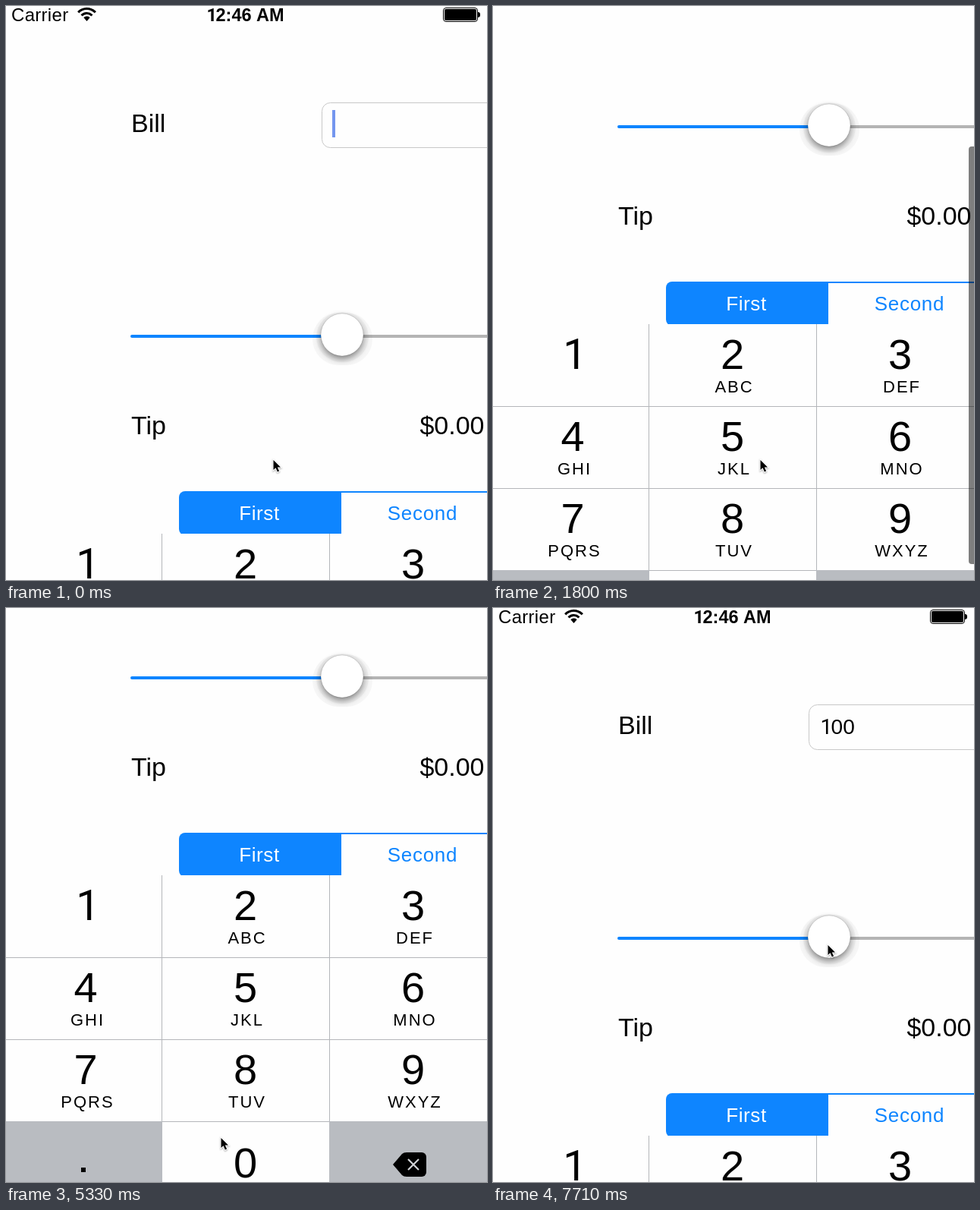
Recreate the animation shown at these times as an HTML page with a canvas. Size 634 by 756 pixels, loop 8 s.

```html
<!DOCTYPE html>
<html lang="en">
<head>
<meta charset="utf-8">
<title>Tip calculator</title>
<style>
html, body { margin: 0; width: 634px; height: 756px; overflow: hidden; background: #fefefe; }
canvas { display: block; }
</style>
</head>
<body>
<canvas id="stage" width="634" height="756"></canvas>
<script>
const c = document.getElementById('stage').getContext('2d');
const LOOP = 8000, BLUE = '#0e85ff', GREY = '#b9bcc1', LINE = '#b4b6ba', PAPER = '#fefefe';
const SANS = '"Liberation Sans", Arial, sans-serif';
const PLAIN_ONE = 'Roboto, sans-serif'; // its 1 has no foot

// Stepped progress: first change at start, last one at end.
function progress(t, start, end, steps) {
  if (t < start) return 0;
  if (t >= end) return 1;
  return (Math.floor((t - start) / (end - start) * (steps - 1)) + 1) / steps;
}
const smooth = p => p * p * (3 - 2 * p);

function scrollAt(t) {
  const down = smooth(progress(t, 150, 2100, 14)) ** 3.8;
  const up = smooth(progress(t, 5890, 6670, 6)) ** 0.515;
  return Math.round(343 * (down - up));
}

const moves = [ // start, end, steps, x, y
  [2400, 2835, 4, 97, 385],
  [2980, 2980, 1, 102, 386],
  [3870, 4460, 5, 283, 700],
  [5330, 5330, 1, 283, 698],
  [5460, 5590, 2, 297, 248],
  [6970, 7710, 6, 441, 444]
];
function pointerAt(t) {
  let x = 352, y = 598;
  for (const [start, end, steps, toX, toY] of moves) {
    const p = smooth(progress(t, start, end, steps));
    x += (toX - x) * p;
    y += (toY - y) * p;
  }
  return [Math.round(x), Math.round(y)];
}

function rect(x, y, w, h, color) {
  c.fillStyle = color;
  c.fillRect(x, y, w, h);
}
function round(x, y, w, h, r, color) {
  c.beginPath();
  c.roundRect(x, y, w, h, r);
  c.fillStyle = color;
  c.fill();
}
function polygon(points) {
  c.beginPath();
  for (const [x, y] of points) c.lineTo(x, y);
  c.closePath();
}
function label(str, x, y, size, { color = '#000', weight = 400, align = 0, spacing = 0 } = {}) {
  const font = family => c.font = `${weight} ${size}px ${family}`;
  c.fillStyle = color;
  c.letterSpacing = spacing + 'px';
  font(SANS);
  x -= c.measureText(str).width * align;
  if (str[0] === '1') {
    font(PLAIN_ONE);
    c.fillText('1', x + size * 0.05, y);
    font(SANS);
    x += c.measureText('1').width;
    str = str.slice(1);
  }
  c.fillText(str, x, y);
}

function statusBar() {
  label('Carrier', 7, 20, 24, { spacing: 0.3 });
  label('12:46 AM', 315, 20, 23.5, { weight: 700, align: 0.5 });
  c.strokeStyle = '#000';
  c.lineWidth = 3;
  for (const r of [9.5, 15.5]) {
    c.beginPath();
    c.arc(106.5, 19, r, -Math.PI * 0.76, -Math.PI * 0.24);
    c.stroke();
  }
  c.beginPath();
  c.moveTo(106.5, 20);
  c.arc(106.5, 19, 5.5, -Math.PI * 0.77, -Math.PI * 0.23);
  c.fillStyle = '#000';
  c.fill();
  c.lineWidth = 1;
  c.beginPath();
  c.roundRect(576.5, 2.5, 45, 18, 3.5);
  c.stroke();
  round(578, 4, 42, 15, 2, '#000');
  round(622, 8, 3, 7, [0, 3, 3, 0], '#000');
}

function form(t) {
  label('Bill', 165, 166, 34);
  c.beginPath();
  c.roundRect(416.5, 127.5, 300, 59, 11);
  c.strokeStyle = '#c8c8c8';
  c.lineWidth = 1;
  c.stroke();
  const typed = t > 5460;
  if (typed) label('100', 430, 166, 28);
  const phase = (t / 1000 + (typed ? 0.5 : 0)) % 1;
  c.globalAlpha = phase >= 0.5 ? 1 : phase < 0.15 ? 0.72 : 0;
  rect(typed ? 476 : 430, 137, 4, 36, '#416fea');
  c.globalAlpha = 1;

  round(164, 433, 290, 4, 2, BLUE);
  rect(443, 433, 200, 4, '#b4b4b4');
  round(404, 404, 79, 69, 34, 'rgba(0,0,0,.03)');
  round(409, 403, 69, 66, 33, 'rgba(0,0,0,.03)');
  c.save();
  c.shadowColor = 'rgba(0,0,0,.45)';
  c.shadowBlur = 8;
  c.shadowOffsetY = 4;
  round(415, 405, 56, 56, 28, '#fff');
  c.restore();
  c.strokeStyle = 'rgba(0,0,0,.13)';
  c.stroke();

  label('Tip', 165, 564, 34);
  label('$0.00', 630.5, 564, 34, { align: 1 });

  round(228, 639, 214, 58, [8, 0, 0, 8], BLUE);
  rect(442, 639, 192, 2, BLUE);
  label('First', 334, 677, 26, { color: '#fff', align: 0.5, spacing: 0.6 });
  label('Second', 549, 677, 26, { color: BLUE, align: 0.5, spacing: 0.7 });
}

const letters = ['', 'ABC', 'DEF', 'GHI', 'JKL', 'MNO', 'PQRS', 'TUV', 'WXYZ'];
const columns = [105, 315.5, 536.5];

function keypad(t) {
  rect(0, 695, 634, 500, PAPER);
  if (t >= 3440 && t < 3580) rect(0, 695, 205, 108, GREY);
  for (let row = 1; row < 4; row++) rect(0, 695 + row * 108, 634, 1, LINE);
  rect(205, 695, 1, 500, LINE);
  rect(426, 695, 1, 500, LINE);
  rect(0, 1019, 206, 150, GREY);
  rect(426, 1019, 208, 150, GREY);
  letters.forEach((word, i) => {
    const x = columns[i % 3], y = 754 + Math.floor(i / 3) * 108;
    label(String(i + 1), x, y, 56, { align: 0.5 });
    label(word, x + 2.5, y + 31, 22, { align: 0.5, spacing: 2 });
  });
  label('0', 315.5, 1093, 56, { align: 0.5 });
  rect(99, 1080, 6, 6, '#000');

  // Delete key
  c.beginPath();
  c.moveTo(510, 1076);
  c.lineTo(522, 1062);
  c.quadraticCurveTo(524, 1060, 528, 1060);
  c.arcTo(554, 1060, 554, 1066, 6);
  c.arcTo(554, 1092, 548, 1092, 6);
  c.lineTo(528, 1092);
  c.quadraticCurveTo(524, 1092, 522, 1090);
  c.fillStyle = '#000';
  c.fill();
  c.beginPath();
  c.moveTo(530, 1069);
  c.lineTo(544, 1083);
  c.moveTo(544, 1069);
  c.lineTo(530, 1083);
  c.strokeStyle = '#d0d2d6';
  c.lineWidth = 2.2;
  c.stroke();
}

function scrollbar(t, scroll) {
  const shown = t < 5000 ? scroll > 0 && t < 2545 : t >= 5890 && t < 7120;
  if (!shown) return;
  const fading = t >= 6970 || (t >= 2400 && t < 5000);
  round(627, Math.round(scroll * 0.7) - 8, 14, 550, 4, `rgba(0,0,0,${fading ? 0.25 : 0.5})`);
}

function pointer(x, y) {
  c.save();
  c.translate(x + 0.5, y);
  polygon([[0, 0], [0, 13], [3, 10.3], [5.3, 15.6], [7.6, 14.6], [5.3, 9.5], [9.5, 9.5]]);
  c.strokeStyle = '#fff';
  c.lineWidth = 2;
  c.shadowColor = 'rgba(0,0,0,.35)';
  c.shadowBlur = 2;
  c.shadowOffsetY = 1;
  c.stroke();
  c.shadowColor = 'transparent';
  c.fillStyle = '#000';
  c.fill();
  c.restore();
}

function draw(t) {
  const scroll = scrollAt(t);
  rect(0, 0, 634, 756, PAPER);
  c.save();
  c.translate(0, -scroll);
  statusBar();
  form(t);
  keypad(t);
  c.restore();
  scrollbar(t, scroll);
  pointer(...pointerAt(t));
}

const begin = performance.now();
function frame() {
  draw((performance.now() - begin) % LOOP);
  requestAnimationFrame(frame);
}
frame();
</script>
</body>
</html>
```
